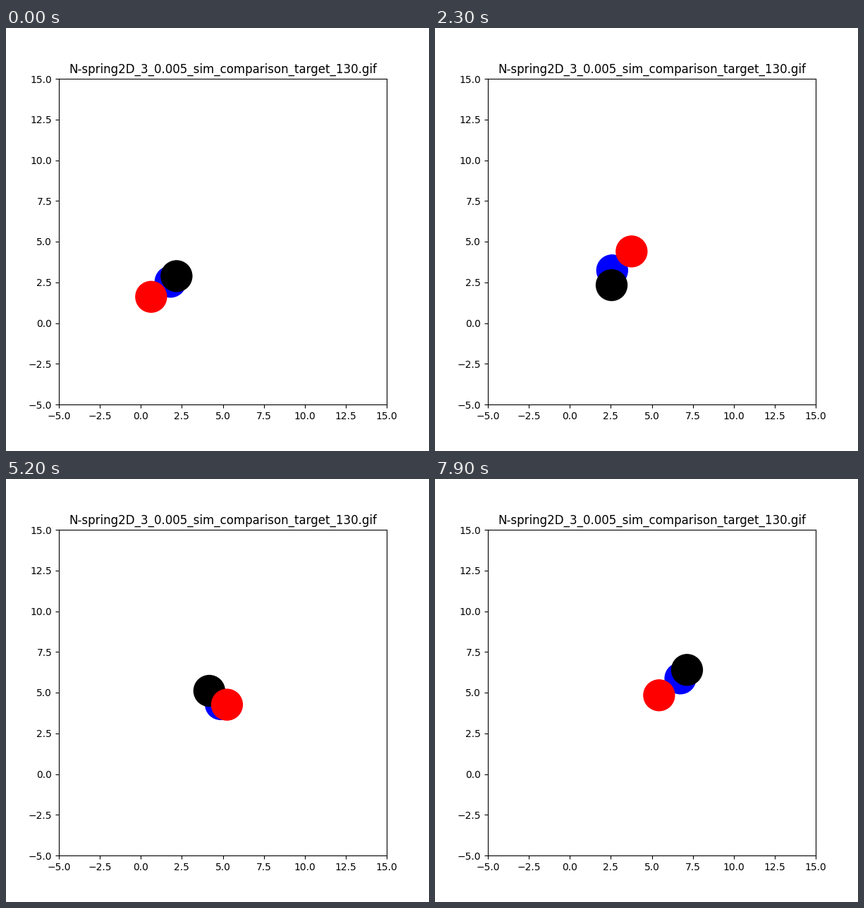
A matplotlib script that plays this animation: 600 px wide and 600 px high, repeating every 8 s.

```python
import numpy as np
import matplotlib.pyplot as plt
from matplotlib.animation import FuncAnimation

FRAMES, STEP_MS, SUBSTEPS = 80, 100, 5
STEP = STEP_MS / 1000
DT = STEP / SUBSTEPS
COLORS = ["blue", "black", "red"]

# Key poses that the spring motion passes through: tick -> xy of each disc
KEYS = {
    0: [(1.80, 2.53), (2.18, 2.88), (0.63, 1.60)],
    11: [(2.48, 2.64), (1.80, 3.68), (2.40, 2.12)],
    23: [(2.57, 3.25), (2.55, 2.33), (3.77, 4.39)],
    52: [(4.87, 4.29), (4.18, 5.11), (5.26, 4.26)],
    79: [(6.74, 5.88), (7.15, 6.39), (5.45, 4.83)],
}
TICKS = list(KEYS)
POSES = np.array(list(KEYS.values()))


def pull(pos, k, rest):
    """Spring acceleration between every pair of unit masses."""
    gap = pos[:, None] - pos[:, :, None]
    dist = np.sqrt((gap ** 2).sum(-1, keepdims=True) + 1e-6)
    return (k * (1 - rest / dist) * gap).sum(2)


def simulate(params):
    """Paths for a batch of parameter rows: (row, tick, disc, xy)."""
    pos = params[:, :6].reshape(-1, 3, 2)
    vel = params[:, 6:12].reshape(-1, 3, 2)
    k, rest = params[:, 12:].T.reshape(2, -1, 1, 1, 1)
    acc = pull(pos, k, rest)
    path = [pos]
    for _ in range(FRAMES - 1):
        for _ in range(SUBSTEPS):
            vel = vel + acc * DT / 2
            pos = pos + vel * DT
            acc = pull(pos, k, rest)
            vel = vel + acc * DT / 2
        path.append(pos)
    return np.stack(path, axis=1)


def guess(k=1.0, rest=0.2, omega=1.6):
    """Launch state of ideal springs joining the first two poses."""
    center = POSES.mean(axis=1, keepdims=True)
    drift = (center[-1] - center[0]) / (TICKS[-1] * STEP)
    local = POSES - center
    phase = omega * TICKS[1] * STEP
    swing = omega * (local[1] - local[0] * np.cos(phase)) / np.sin(phase)
    return np.concatenate([POSES[0].ravel(), (swing + drift).ravel(), [k, rest]])


def misfit(params):
    return (simulate(params)[:, TICKS] - POSES).reshape(len(params), -1)


def fit(params, rounds=30, eps=1e-5):
    """Levenberg-Marquardt search for the launch state and springs."""
    damping = 1e-2
    for _ in range(rounds):
        res = misfit(np.vstack([params, params + eps * np.eye(len(params))]))
        jac = (res[1:] - res[0]).T / eps
        hess = jac.T @ jac
        lhs = hess + damping * np.diag(np.diag(hess))
        trial = params - np.linalg.solve(lhs, jac.T @ res[0])
        if (misfit(trial[None]) ** 2).sum() < (res[0] ** 2).sum():
            params, damping = trial, damping / 3
        else:
            damping *= 4
    return params


path = simulate(fit(guess())[None])[0]

fig, ax = plt.subplots(figsize=(6, 6), dpi=100)
ax.set_xlim(-5, 15)
ax.set_ylim(-5, 15)
ax.set_title("N-spring2D_3_0.005_sim_comparison_target_130.gif")
discs = ax.scatter(path[0, :, 0], path[0, :, 1], s=1000, c=COLORS, linewidths=1)


def update(tick):
    discs.set_offsets(path[tick])
    return (discs,)


anim = FuncAnimation(fig, update, frames=FRAMES, interval=STEP_MS,
                     repeat=True, repeat_delay=0, blit=False)
plt.show()
```
